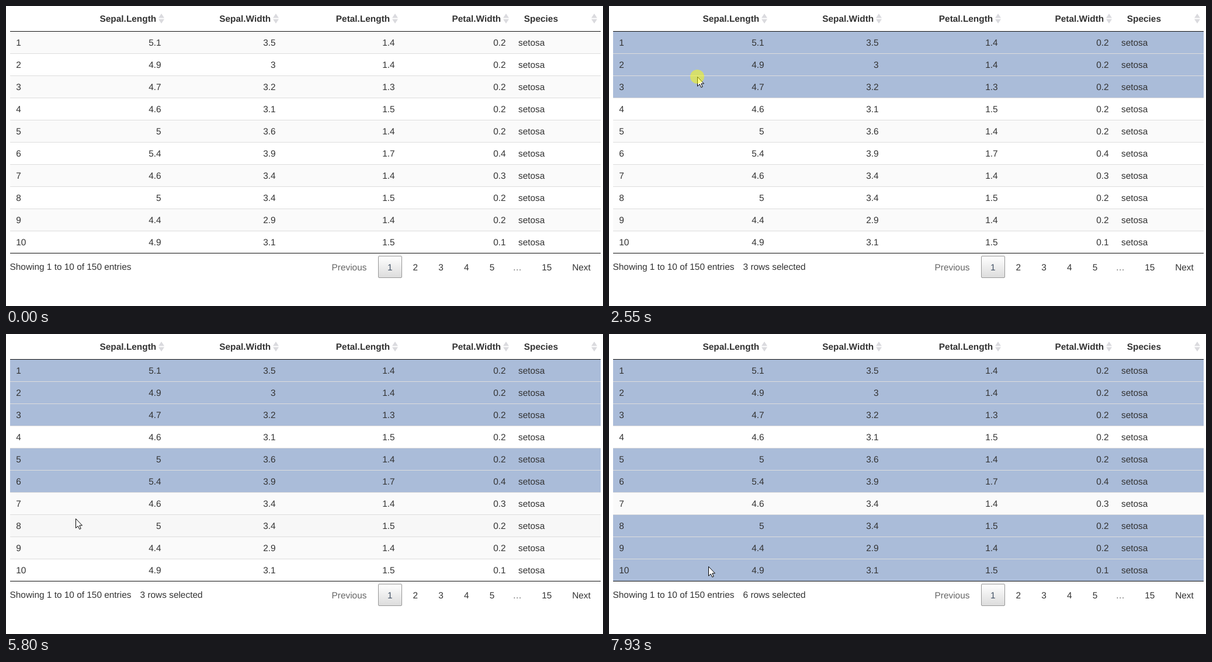
Write an HTML page that moves like this. It is 1022x514 px and loops after 8 s.

```html
<!DOCTYPE html>
<html lang="en">
<head>
<meta charset="utf-8">
<title>Selectable table</title>
<style>
  html, body { margin: 0; width: 100%; height: 100%; overflow: hidden; background: #fff; }
  svg { display: block; width: 100vw; height: 100vh; }
  text { font: 15.4px "Liberation Sans", Arial, sans-serif; fill: #333; text-rendering: geometricPrecision; white-space: pre; }
  .head { font-weight: bold; }
  .muted { fill: #666; }
  .current { fill: #445366; }
</style>
</head>
<body>
<svg id="stage" viewBox="0 0 1022 514" xmlns="http://www.w3.org/2000/svg">
  <defs>
    <linearGradient id="button" x1="0" y1="0" x2="0" y2="1">
      <stop offset="0" stop-color="#fff"/>
      <stop offset="1" stop-color="#dcdcdc"/>
    </linearGradient>
  </defs>
</svg>
<script>
const DURATION = 8000;
const ROW_TOP = 44, ROW_HEIGHT = 38;
const SELECTED = '#aabcd9', HOVER = '#f7f7f7', ODD = '#fafafa', EVEN = '#fff';
const stage = document.getElementById('stage');

function add(tag, attrs, content = '') {
  const el = document.createElementNS('http://www.w3.org/2000/svg', tag);
  for (const name in attrs) el.setAttribute(name, attrs[name]);
  el.textContent = content;
  return stage.appendChild(el);
}
const label = (x, y, content, anchor = 'start', style = '') =>
  add('text', { x, y, 'text-anchor': anchor, class: style }, content);
const rule = (y, fill) => add('rect', { x: 7, y, width: 1011, height: 1, fill });
const sortIcon = x => add('path', {
  d: `M${x - 5} 20.5l5 -7.5l5 7.5zm0 2l5 7.5l5 -7.5z`, fill: '#dadade'
});
const rowAt = y => Math.floor((y - ROW_TOP) / ROW_HEIGHT);

// Table
const columns = [
  { title: 'Sepal.Length', right: 266, values: '5.1 4.9 4.7 4.6 5 5.4 4.6 5 4.4 4.9' },
  { title: 'Sepal.Width', right: 462, values: '3.5 3 3.2 3.1 3.6 3.9 3.4 3.4 2.9 3.1' },
  { title: 'Petal.Length', right: 666, values: '1.4 1.4 1.3 1.5 1.4 1.7 1.4 1.5 1.4 1.5' },
  { title: 'Petal.Width', right: 856, values: '0.2 0.2 0.2 0.2 0.2 0.4 0.3 0.2 0.2 0.1' }
];
const rows = [];
for (let i = 0; i < 10; i++) {
  const y = ROW_TOP + i * ROW_HEIGHT;
  rows.push(add('rect', { x: 7, y, width: 1011, height: ROW_HEIGHT - 1 }));
  rule(y + ROW_HEIGHT - 1, '#ddd');
  label(17.2, y + 24, i + 1);
  for (const c of columns) label(c.right - 0.4, y + 24, c.values.split(' ')[i], 'end');
  label(877, y + 24, 'setosa');
}
for (const c of columns) {
  label(c.right - 8.8, 27, c.title, 'end', 'head');
  sortIcon(c.right);
}
label(886.8, 27, 'Species', 'start', 'head');
sortIcon(1007);
rule(43, '#111');
rule(423, '#111');

// Footer
label(6.5, 452, 'Showing 1 to 10 of 150 entries');
const info = label(229.6, 452, '');
add('rect', { x: 637.5, y: 428.5, width: 40, height: 37, rx: 1.5, fill: 'url(#button)', stroke: '#979797' });
label(587.5, 453, 'Previous', 'middle', 'muted');
for (let i = 0; i < 5; i++) label(657.2 + 43.7 * i, 453, i + 1, 'middle', i ? '' : 'current');
label(875.2, 453, '…', 'middle', 'muted');
label(925.8, 453, '15', 'middle');
label(985, 453, 'Next', 'middle');

// Pointer
const cursor = add('path', {
  d: 'M.5 .5V16.5L4.2 13L6.8 18.5L9.2 17.4L6.8 12H11.5z',
  fill: '#fff', stroke: '#000', 'stroke-linejoin': 'round'
});
const halo = add('circle', { r: 12, fill: '#ff0', 'fill-opacity': .5 });

// Each stop: departure time and destination; travel time follows from the distance.
const START = [822, 462];
const stops = [
  [280, 168, 79], [1370, 151, 56], [1960, 151, 92], [2260, 151, 121],
  [2700, 150, 130], [3250, 129, 233], [3630, 131, 223], [4570, 129, 250],
  [5500, 119, 316], [6450, 117, 357], [6910, 114, 417], [7700, 170, 398]
];
const STEP = 75;

function pointerAt(t) {
  let [x, y] = START;
  for (const [start, endX, endY] of stops) {
    if (t < start) break;
    const dx = endX - x, dy = endY - y;
    const travel = 180 + 0.6 * Math.hypot(dx, dy);
    const elapsed = t - start;
    const u = elapsed >= travel ? 1 : Math.min(1, (Math.floor(elapsed / STEP) + 1) * STEP / travel);
    const eased = u * u * (3 - 2 * u);
    x += dx * eased;
    y += dy * eased;
  }
  return [Math.round(x), Math.round(y)];
}

// A click selects the row under the pointer; the counter follows shortly after.
const HOLD = 130, COUNTER_DELAY = 50;
const clicks = [1820, 2200, 2490, 4200, 5190, 6280, 6690, 7240]
  .map(time => ({ time, row: rowAt(pointerAt(time)[1]) }));

// The counter stays at three for two clicks, then goes on counting.
function infoText(t) {
  const made = clicks.filter(c => t >= c.time + COUNTER_DELAY).length;
  const count = made < 4 ? made : Math.max(3, made - 2);
  return count ? `${count} row${count > 1 ? 's' : ''} selected` : '';
}

function draw(t) {
  const [x, y] = pointerAt(t);
  const visible = t >= stops[0][0];
  const pressed = clicks.some(c => t >= c.time && t < c.time + HOLD);
  cursor.setAttribute('transform', `translate(${x} ${y})`);
  cursor.setAttribute('visibility', visible ? 'visible' : 'hidden');
  halo.setAttribute('cx', x);
  halo.setAttribute('cy', y);
  halo.setAttribute('visibility', pressed ? 'visible' : 'hidden');

  const hovered = visible ? rowAt(y) : -1;
  rows.forEach((row, i) => {
    const selected = clicks.some(c => c.row === i && t >= c.time);
    row.setAttribute('fill', selected ? SELECTED : i === hovered ? HOVER : i % 2 ? EVEN : ODD);
  });
  info.textContent = infoText(t);
}

const begin = performance.now();
function tick() {
  draw((performance.now() - begin) % DURATION);
  requestAnimationFrame(tick);
}
tick();
</script>
</body>
</html>
```
